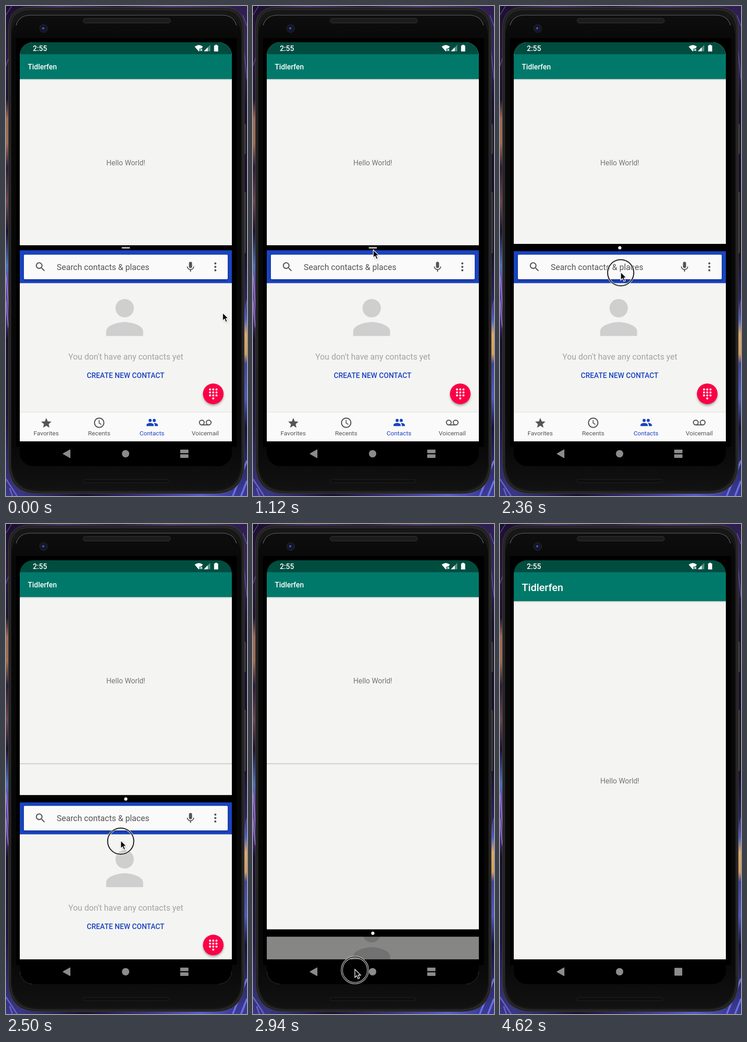
Write an HTML page that moves like this. It is 525 by 1067 pixels and loops after 7.62 s.

```html
<!DOCTYPE html>
<html lang="en">
<head>
<meta charset="utf-8">
<title>Split screen dismiss</title>
<style>
  html, body { margin: 0; width: 100%; height: 100%; overflow: hidden; background: #120c22; }
  svg { display: block; width: 100%; height: 100%; }
  text { font-family: Roboto, sans-serif; font-size: 15.72px; }
  .mid { text-anchor: middle; }
  .bold { font-weight: 500; }
  .tab { font-size: 13.48px; text-anchor: middle; }
  .body { font-size: 17.97px; }
  .title { font-size: 22.46px; }

  .cursor, .ring, .drag, .content, .dim, .bar, .grip, .split, .full {
    animation: 7620ms linear infinite;
  }
  .cursor { animation-name: cursor; }
  .ring { animation-name: ring; animation-timing-function: step-end; }
  .drag { animation-name: drag; }
  .content { animation-name: content; }
  .dim { animation-name: dim; }
  .bar { animation-name: bar; }
  .grip { animation-name: grip; }
  .split { animation-name: split; animation-timing-function: step-end; }
  .full { animation-name: full; animation-timing-function: step-end; }

  @keyframes cursor {
    0% { transform: translate(472px, 668px); }
    1.31% { transform: translate(472px, 668px); animation-timing-function: ease-in-out; }
    11.81%, 25.72% { transform: translate(262px, 531px); }
    29.4% { transform: translate(263px, 533px); }
    30.97% { transform: translate(263px, 578.5px); }
    32.55% { transform: translate(252px, 674px); }
    34.91% { transform: translate(233.5px, 805.5px); }
    38.58% { transform: translate(222px, 969px); }
    41.47%, 100% { transform: translate(214px, 1110px); }
  }
  @keyframes ring {
    0% { visibility: hidden; }
    25.72% { visibility: visible; }
    41.47%, 100% { visibility: hidden; }
  }
  @keyframes drag {
    0%, 31.1% { transform: translateY(0); }
    32.55% { transform: translateY(55px); }
    33.73% { transform: translateY(130px); }
    34.91% { transform: translateY(197px); }
    36.75% { transform: translateY(285px); }
    38.58% { transform: translateY(364px); }
    40.42%, 100% { transform: translateY(440px); }
  }
  @keyframes content {
    0%, 31.1% { transform: translateY(0); }
    32.55% { transform: translateY(55px); }
    33.73% { transform: translateY(130px); }
    34.91% { transform: translateY(180px); }
    36.75% { transform: translateY(209px); }
    38.58% { transform: translateY(233px); }
    40.42%, 100% { transform: translateY(256px); }
  }
  @keyframes dim {
    0%, 35% { opacity: 0; }
    38.58% { opacity: .45; }
    40.42%, 100% { opacity: .7; }
  }
  @keyframes bar {
    0%, 25.72% { y: 521px; height: 11px; }
    27.56%, 100% { y: 518px; height: 16px; }
  }
  @keyframes grip {
    0%, 25.72% { x: 252px; y: 525.5px; width: 18px; height: 2.2px; rx: 1px; }
    27.56%, 100% { x: 257.5px; y: 523px; width: 7px; height: 7px; rx: 3.5px; }
  }
  @keyframes split {
    0% { visibility: visible; }
    47.77%, 100% { visibility: hidden; }
  }
  @keyframes full {
    0% { visibility: hidden; }
    47.77%, 100% { visibility: visible; }
  }
</style>
</head>
<body>
<svg viewBox="0 0 525 1067">
  <defs>
    <linearGradient id="wallLeft" x2="0" y2="1">
      <stop offset="0" stop-color="#1c1030"/>
      <stop offset=".1" stop-color="#2a1740"/>
      <stop offset=".19" stop-color="#1d1230"/>
      <stop offset=".23" stop-color="#a06858"/>
      <stop offset=".28" stop-color="#a06c52"/>
      <stop offset=".33" stop-color="#2b1a38"/>
      <stop offset=".4" stop-color="#6a4650"/>
      <stop offset=".46" stop-color="#1b1230"/>
      <stop offset=".53" stop-color="#4f70bc"/>
      <stop offset=".57" stop-color="#6a42b4"/>
      <stop offset=".63" stop-color="#5a369c"/>
      <stop offset=".68" stop-color="#17102a"/>
      <stop offset=".85" stop-color="#1f1640"/>
      <stop offset="1" stop-color="#3a3888"/>
    </linearGradient>
    <linearGradient id="wallRight" x2="0" y2="1">
      <stop offset="0" stop-color="#2f1d50"/>
      <stop offset=".1" stop-color="#33285c"/>
      <stop offset=".2" stop-color="#1b1232"/>
      <stop offset=".5" stop-color="#171028"/>
      <stop offset=".6" stop-color="#2b2460"/>
      <stop offset=".64" stop-color="#5060c4"/>
      <stop offset=".67" stop-color="#e0aa66"/>
      <stop offset=".71" stop-color="#d8a05e"/>
      <stop offset=".73" stop-color="#40439c"/>
      <stop offset=".8" stop-color="#4c5ac4"/>
      <stop offset=".86" stop-color="#15123a"/>
      <stop offset="1" stop-color="#3c3c98"/>
    </linearGradient>
    <linearGradient id="wallTop">
      <stop offset="0" stop-color="#1c1030"/>
      <stop offset=".2" stop-color="#4a2a72"/>
      <stop offset=".45" stop-color="#24143e"/>
      <stop offset=".7" stop-color="#56357c"/>
      <stop offset="1" stop-color="#2f1d50"/>
    </linearGradient>
    <linearGradient id="wallBottom">
      <stop offset="0" stop-color="#3a3888"/>
      <stop offset=".3" stop-color="#17102e"/>
      <stop offset=".6" stop-color="#3c3484"/>
      <stop offset=".85" stop-color="#5a5cd0"/>
      <stop offset="1" stop-color="#3c3c98"/>
    </linearGradient>
    <linearGradient id="glass" x2="0" y2="1">
      <stop offset="0" stop-color="#0e0e0e"/>
      <stop offset=".06" stop-color="#080808"/>
      <stop offset=".9" stop-color="#080808"/>
      <stop offset="1" stop-color="#121212"/>
    </linearGradient>
    <linearGradient id="shade" x2="0" y2="1">
      <stop offset="0" stop-opacity=".22"/>
      <stop offset="1" stop-opacity="0"/>
    </linearGradient>
    <filter id="soft" x="-50%" y="-50%" width="200%" height="200%">
      <feGaussianBlur stdDeviation="2.5"/>
    </filter>
    <clipPath id="screen"><rect x="30" y="79" width="462" height="923" rx="29"/></clipPath>
  </defs>

  <!-- wallpaper -->
  <rect width="263" height="1067" fill="url(#wallLeft)"/>
  <rect x="263" width="262" height="1067" fill="url(#wallRight)"/>
  <rect x="20" width="485" height="8" fill="url(#wallTop)"/>
  <rect x="30" y="1056" width="465" height="11" fill="url(#wallBottom)"/>
  <g fill="none" stroke-width="1.4">
    <path d="M0 585Q4 620 6 680M0 640L5 700" stroke="#a88cd8"/>
    <path d="M0 20L12 0M0 130L6 112" stroke="#6a469a"/>
    <path d="M516 20L525 44M519 100L525 160M525 640L518 690" stroke="#6458b0"/>
    <path d="M0 1030L24 1067M8 1050L14 1067" stroke="#6a60c4" stroke-width="3"/>
    <path d="M525 990L494 1067M525 1034L512 1067" stroke="#6a70e0" stroke-width="4"/>
  </g>

  <!-- phone body -->
  <g fill="#363636" stroke="#555" stroke-width=".8">
    <rect x="516" y="257" width="6" height="65" rx="2"/>
    <rect x="516" y="405" width="6" height="133" rx="2"/>
  </g>
  <path d="M49 3H475Q519 3 519 48V1003Q515 1062 454 1062H70Q9 1062 5.500 1003V48Q6 3 49 3Z" fill="#222" stroke="#424240"/>
  <path d="M50 8H474Q514 9 515 50V1002Q511 1057 453 1058H71Q13 1057 9.500 1002V50Q10 9 50 8Z" fill="#171717" stroke="#2e2e2c" stroke-width="1.500"/>
  <path d="M52 20H472Q506 20 512 60V1000Q507 1053 452 1054H72Q17 1053 12 1000V60Q18 20 52 20Z" fill="url(#glass)"/>
  <path d="M22 42Q28 20 54 20H470Q496 20 502 42" fill="none" stroke="#6c6c6c" stroke-width="1.200"/>
  <rect x="22" y="70" width="481" height="890" fill="#000"/>
  <rect x="168" y="27" width="190" height="10" rx="4.500" fill="#1c1c1c" stroke="#383838"/>
  <rect x="168" y="1031" width="186" height="7" rx="3" fill="#0e0e0e" stroke="#232323"/>
  <circle cx="82" cy="49" r="9" fill="#17171f" stroke="#24242a"/>
  <circle cx="82" cy="49" r="5.500" fill="#14163c"/>
  <circle cx="81" cy="48.500" r="2" fill="#5a6cc4"/>

  <g clip-path="url(#screen)">
    <!-- lower app -->
    <g class="split">
      <g class="content">
        <rect x="30" y="532" width="462" height="420" fill="#f4f4f2"/>
        <rect x="30" y="530" width="462" height="73.500" fill="#1a44c2"/>
        <rect x="39" y="543" width="444" height="54" rx="2" opacity=".35" filter="url(#soft)"/>
        <rect x="39" y="541.500" width="444" height="53.500" rx="2" fill="#fafafa"/>
        <g fill="#555">
          <path transform="translate(61.600 554.600) scale(1.123)" d="M15.500 14h-.79l-.28-.27A6.500 6.500 0 1 0 13.730 14.430l.27.28v.79l5 4.990L20.490 19zm-6 0a4.500 4.500 0 1 1 0-9 4.500 4.500 0 0 1 0 9z"/>
          <path transform="translate(388.500 554.800) scale(1.123)" d="M12 14a3 3 0 0 0 3-3V5a3 3 0 0 0-6 0v6a3 3 0 0 0 3 3zm5.300-3c0 3-2.540 5.100-5.300 5.100S6.700 14 6.700 11H5c0 3.410 2.720 6.230 6 6.720V21h2v-3.280c3.280-.48 6-3.300 6-6.720z"/>
          <circle cx="456" cy="560.500" r="2.300"/>
          <circle cx="456" cy="568" r="2.300"/>
          <circle cx="456" cy="575.500" r="2.300"/>
          <text class="body" x="110.500" y="575">Search contacts &amp; places</text>
        </g>
        <g fill="#cfcfcf">
          <circle cx="258.500" cy="658" r="20"/>
          <path transform="translate(198.100 617.800) scale(5.030)" d="M12 14c-2.670 0-8 1.340-8 4v2h16v-2c0-2.660-5.330-4-8-4z"/>
        </g>
        <text class="body mid" x="261" y="770" fill="#a3a3a3">You don't have any contacts yet</text>
        <text class="bold mid" x="260.500" y="810" fill="#1a44c2">CREATE NEW CONTACT</text>

        <circle cx="451.500" cy="848" r="22" opacity=".35" filter="url(#soft)"/>
        <circle cx="451.500" cy="844.500" r="22.500" fill="#fc0046"/>
        <path d="M444.500 835h.01M451.500 835h.01M458.500 835h.01M444.500 841.500h.01M451.500 841.500h.01M458.500 841.500h.01M444.500 848h.01M451.500 848h.01M458.500 848h.01M451.500 854.500h.01"
          stroke="#fff" stroke-width="4.600" stroke-linecap="round"/>

        <rect x="30" y="883.500" width="462" height="2" fill="#e6e6e4"/>
        <rect x="30" y="885" width="462" height="64" fill="#fafafa"/>
        <g fill="#555">
          <path transform="translate(74.300 894.700) scale(1.123)" d="M12 17.270L18.180 21l-1.640-7.030L22 9.240l-7.190-.61L12 2 9.190 8.630 2 9.240l5.460 4.730L5.820 21z"/>
          <text class="tab" x="87.500" y="935">Favorites</text>
          <text class="tab" x="203" y="935">Recents</text>
          <text class="tab" x="434" y="935">Voicemail</text>
        </g>
        <g fill="none" stroke="#555" stroke-width="2.200">
          <circle cx="203" cy="907.500" r="10.200"/>
          <path d="M202.800 901.500V908.200L207.800 911.200" stroke-width="1.800"/>
          <circle cx="426.500" cy="907" r="5.200"/>
          <circle cx="441.500" cy="907" r="5.200"/>
          <path d="M426.500 912.200H441.500"/>
        </g>
        <g fill="#1a44c2">
          <g transform="translate(305 893.500) scale(1.123)">
            <circle cx="8" cy="8" r="3"/>
            <circle cx="16" cy="8" r="3"/>
            <path d="M8 13c-2.330 0-7 1.170-7 3.500V19h14v-2.500c0-2.330-4.670-3.500-7-3.500zm8 0c-.29 0-.62.02-.97.05 1.160.84 1.970 1.970 1.970 3.450V19h6v-2.500c0-2.330-4.670-3.500-7-3.500z"/>
          </g>
          <text class="tab" x="318" y="935">Contacts</text>
        </g>
      </g>
      <rect class="dim" x="30" y="532" width="462" height="416"/>
    </g>

    <!-- upper app, revealed as the divider moves down -->
    <rect class="drag" x="30" y="60" width="462" height="461" fill="#f4f4f2"/>
    <g class="split">
      <rect x="30" y="105" width="462" height="416" fill="#f4f4f2"/>
      <rect x="30" y="521" width="462" height="3" fill="url(#shade)"/>
      <rect x="30" y="105" width="462" height="54" fill="#00796b"/>
      <rect x="30" y="159" width="462" height="3" fill="url(#shade)"/>
      <text class="bold" x="47.500" y="138" fill="#fff">Tidlerfen</text>
      <text class="mid" x="261" y="346.500" fill="#757575">Hello World!</text>
      <g class="drag">
        <rect class="bar" x="30" y="521" width="462" height="11"/>
        <rect class="grip" x="252" y="525.500" width="18" height="2.200" fill="#fff"/>
      </g>
    </g>
    <g class="full">
      <rect x="30" y="105" width="462" height="843" fill="#f4f4f2"/>
      <rect x="30" y="105" width="462" height="63" fill="#00796b"/>
      <rect x="30" y="168" width="462" height="3" fill="url(#shade)"/>
      <text class="bold title" x="47.500" y="145.500" fill="#fff">Tidlerfen</text>
      <text class="mid" x="261" y="564.500" fill="#757575">Hello World!</text>
    </g>

    <!-- status bar -->
    <rect x="30" y="79" width="462" height="26" fill="#004d40"/>
    <g fill="#fff">
      <text class="bold" x="58.500" y="98">2:55</text>
      <path d="M411 88.500Q420 81.500 429 88.500L425.500 92.500H421.500V97.500L420 99Z"/>
      <path d="M423 93.500l4.500 4.500m0-4.500l-4.500 4.500" stroke="#fff" stroke-width="1.400"/>
      <path d="M431 98.500L445 84.500V98.500Z" opacity=".35"/>
      <path d="M431 98.500L439.500 90V98.500Z"/>
      <path d="M455.500 84.500h4.500v1.500h2.200v13h-8.900v-13h2.200z"/>
    </g>

    <!-- navigation bar -->
    <rect x="30" y="948" width="462" height="54"/>
    <g fill="#8c8c8c">
      <path d="M124.500 975L139.500 966.500V983.500Z" stroke="#8c8c8c" stroke-width="1.500" stroke-linejoin="round"/>
      <circle cx="260.500" cy="975" r="8"/>
      <g class="split">
        <rect x="379.500" y="966" width="18" height="7.700" rx="1"/>
        <rect x="379.500" y="976.300" width="18" height="7.700" rx="1"/>
      </g>
      <rect class="full" x="380" y="966.500" width="17" height="17" rx="1"/>
    </g>
  </g>

  <!-- pointer -->
  <g class="cursor">
    <g class="ring" fill="none">
      <circle cy="1.500" r="28.500" stroke="#fff" stroke-width="4"/>
      <circle cy="1.500" r="28.500" stroke="#000" stroke-width="2"/>
    </g>
    <path d="M1 2V19L5 15.500 7.500 22 11 20.500 8 14H13Z" opacity=".3" filter="url(#soft)"/>
    <path d="M0 0V17.500L4 13.700 6.800 20.300 10 18.900 7.200 12.500H12.500Z" stroke="#fff" stroke-width="1.400"/>
  </g>
</svg>
</body>
</html>
```
